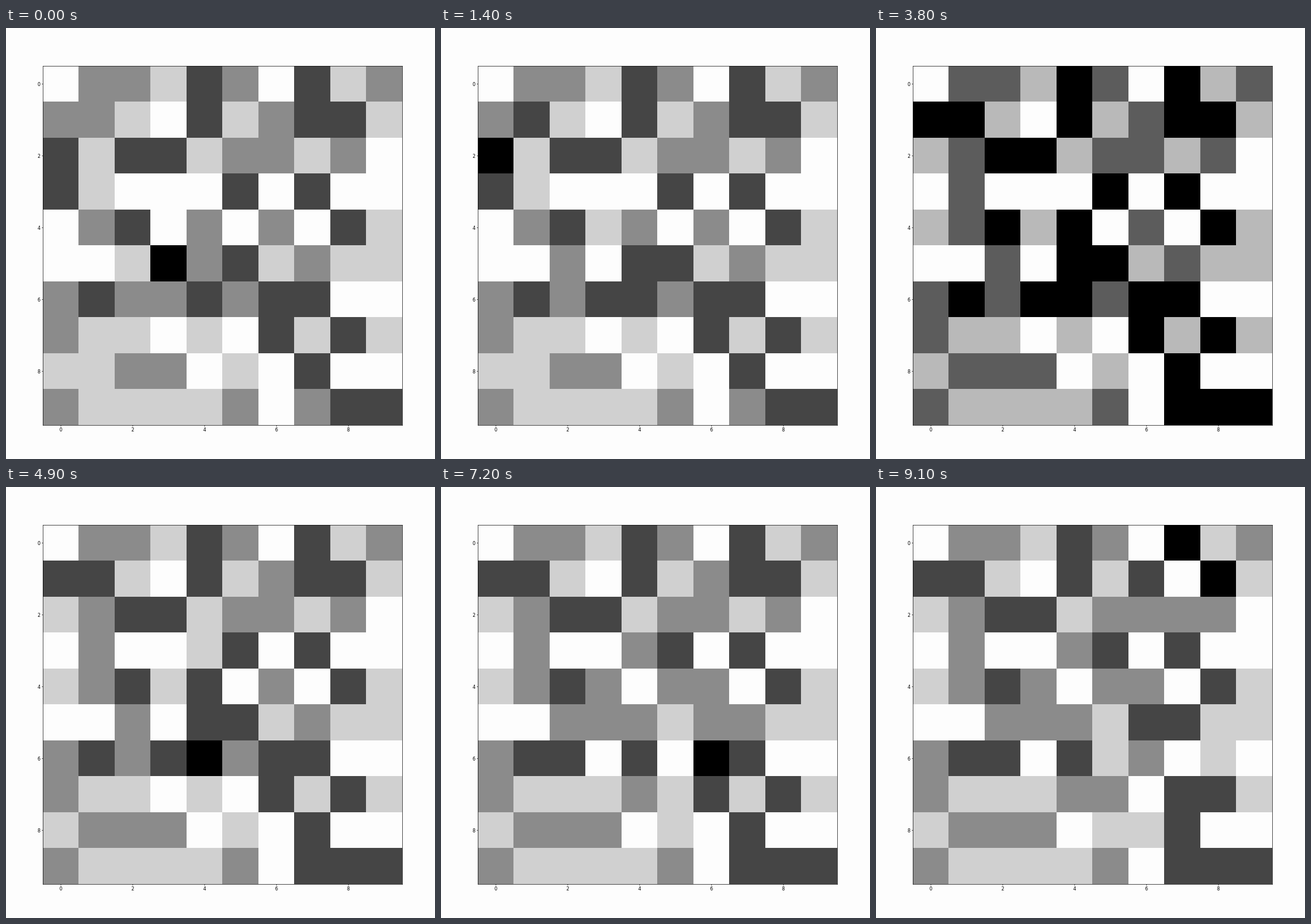
A matplotlib script for the animation above (9400 ms loop, 746x750 px).

```python
import numpy as np
import matplotlib.pyplot as plt
from matplotlib.animation import FuncAnimation

# Abelian sandpile: grains drop one by one, full cells topple onto neighbours.
W, H, DPI = 746, 750, 64
LEFT, TOP, SIDE = 64, 66, 625
FRAMES, INTERVAL, BEAT = 94, 100, 5
PAPER = 253

START = """
0221320312
2210312331
3133122120
3100030300
0230202031
0014231211
2322323300
2110103131
1122010300
2111120233
"""
GRAINS = {9: (1, 1), 14: (2, 0), 29: (4, 4), 34: (8, 1),
          38: (9, 7), 44: (3, 4), 49: (6, 4), 84: (1, 7)}


def topple(grid):
    full = np.pad(grid >= 4, 1).astype(int)
    spill = sum(np.roll(full, step, axis) for step in (-1, 1) for axis in (0, 1))
    return grid + (spill - 4 * full)[1:-1, 1:-1]


def simulate():
    grid = np.array([list(row) for row in START.split()], dtype=int)
    states = []
    for i in range(FRAMES):
        if i in GRAINS:
            grid = grid.copy()
            grid[GRAINS[i]] += 1
        elif i % BEAT == BEAT - 1:
            grid = topple(grid)
        states.append(grid)
    return states


def shade(grid):
    """Grey level relative to the tallest pile on the board."""
    return np.minimum(PAPER, 277 * (1 - grid / grid.max()))


states = simulate()

plt.rcParams["font.family"] = "DejaVu Sans"
fig = plt.figure(figsize=(W / DPI, H / DPI), dpi=DPI, facecolor=str(PAPER / 255))
ax = fig.add_axes([LEFT / W, 1 - (TOP + SIDE) / H, SIDE / W, SIDE / H])
image = ax.imshow(shade(states[0]), cmap="gray", vmin=0, vmax=255,
                  interpolation="nearest", aspect="auto")
ax.set_xticks(range(0, 10, 2))
ax.set_yticks(range(0, 10, 2))
ax.tick_params(labelsize=9, length=2.8, width=0.8, pad=2.2)
for spine in ax.spines.values():
    spine.set_linewidth(0.8)


def update(i):
    image.set_data(shade(states[i]))
    return [image]


anim = FuncAnimation(fig, update, frames=FRAMES, interval=INTERVAL,
                     repeat=True, repeat_delay=0, blit=False)
plt.show()
```
